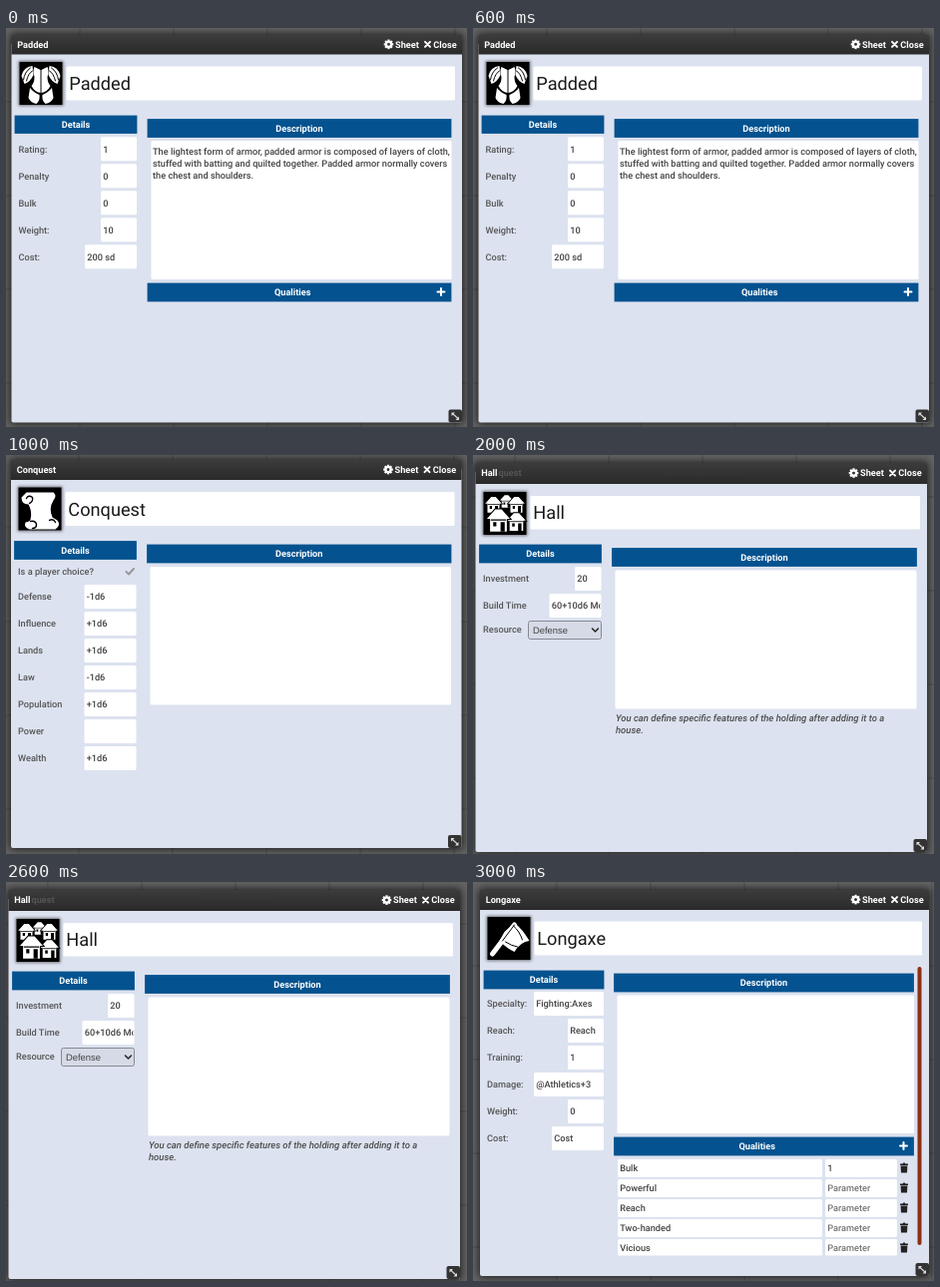
These frames come from a looping animation (462 by 400 pixels, 4 s). An HTML page:

```html
<!DOCTYPE html>
<html lang="en">
<head>
<meta charset="utf-8">
<title>Item sheets</title>
<style>
html, body { margin: 0; width: 100%; height: 100%; overflow: hidden; background: #555; }
#stage { display: block; width: 462px; height: 400px; }
text { font: 500 9.2px Roboto, "Open Sans", sans-serif; fill: #434343; text-rendering: geometricPrecision; white-space: pre; }
.label { fill: #555; }
.soft { fill: #747474; }
.bold { font-weight: 700; fill: #fff; }
.ghost { font-weight: 700; fill: #555; }
.mid { text-anchor: middle; }
.title { font-size: 18.2px; font-weight: 400; fill: #191919; }
.hint { font-size: 9.5px; font-style: italic; fill: #4c4c4c; }
.pick { font: 9.4px "Liberation Sans", Arial, sans-serif; }
</style>
</head>
<body>
<svg id="stage" viewBox="0 0 462 400" xmlns="http://www.w3.org/2000/svg">
  <defs>
    <linearGradient id="bar" x2="0" y2="1">
      <stop stop-color="#3c3c3c"/><stop offset=".3" stop-color="#363636"/><stop offset="1" stop-color="#2a2a2a"/>
    </linearGradient>
    <filter id="blur" x="-20%" y="-20%" width="140%" height="140%"><feGaussianBlur stdDeviation="4"/></filter>
    <filter id="glow" x="-20%" y="-20%" width="140%" height="140%"><feGaussianBlur stdDeviation="1.5"/></filter>
  </defs>
</svg>
<script>
const STEP = 1000;
const stage = document.getElementById("stage");

const rect = (x, y, r, b, fill, extra = "") =>
  `<rect x="${x}" y="${y}" width="${r - x}" height="${b - y}" fill="${fill}" ${extra}/>`;
const path = (d, fill, extra = "") => `<path d="${d}" fill="${fill}" ${extra}/>`;
const line = (d, color, w) => path(d, "none", `stroke="${color}" stroke-width="${w}" stroke-linecap="round" stroke-linejoin="round"`);
const at = (x, y, body) => `<g transform="translate(${x} ${y})">${body}</g>`;
// y is the middle of the capitals
const text = (x, y, s, cls = "") => `<text x="${x}" y="${y + 3.3}" class="${cls}">${s}</text>`;

const box = (x, y, r, b) => rect(x, y, r, b, "#fff", 'rx="1.5"');
const field = (x, y, r, b, s, cls) => box(x, y, r, b) +
  `<svg x="${x}" y="${y}" width="${r - x - 1}" height="${b - y}">${text(2.2, (b - y) / 2, s, cls)}</svg>`;
const heading = (x, y, r, b, s, shift = 0) => rect(x - .4, y - .4, r + .4, b + .4, "#04528f") +
  text((x + r) / 2 + shift, (y + b) / 2, s, "bold mid");
const plus = (x, y) => line(`M${x - 3.5} ${y}h7M${x} ${y - 3.5}v7`, "#fff", 2);
// The add button pushes the caption to the left
const qualities = (x, y, r, b) => heading(x, y, r, b, "Qualities", -6.8) + plus(r - 10, (y + b) / 2 - .5);

const gear = (x, y) => {
  let teeth = "";
  for (let a = 0; a < 360; a += 45) teeth += `<rect x="-1.1" y="-4.8" width="2.2" height="3" fill="#fff" transform="rotate(${a})"/>`;
  return at(x, y, teeth + '<circle r="2.6" fill="none" stroke="#fff" stroke-width="2.2"/>');
};
const trash = (x, y) => at(x, y, path("M-4-4h2.6l.6-1h1.6l.6 1H4v1.4h-8zM-3.4-1.9h6.8L3 5h-6z", "#222"));

const mirror = body => body + `<g transform="translate(43 0) scale(-1 1)">${body}</g>`;

const armor = mirror(
  path("M13 4Q4 5 2 14l3 8q6-2 9-9z", "#fff") +
  line("M11 6Q5 10 4 18M13 9Q9 11 7 19", "#000", 1) +
  path("M21 8l-6-3q-2 4 0 10 0 6-3 9 3 6 9 7z", "#fff") +
  path("M10.500 26q4 5 9.500 7 1 5-3 9-6-1-8-6z", "#fff"));

const scroll =
  path("M8 5h27q4 3 0 8-5 8-1 17l5 3q4 5-2 9H11q-6-2-4-7 5-1 5-3 2-8-2-15-7 0-7-7z", "#fff") +
  line("M11 16q4-2 3-6-4-3-6 1M12 34q5-1 6 3 0 4-4 4M31 33q4-2 6 2", "#000", 1.4);

const house = (x, y, s) => `<g transform="translate(${x} ${y}) scale(${s})">` +
  path("M-11 1L-3-8 3-8 11 1H8V13H-8V1z", "#fff", 'stroke="#000" stroke-width="2" paint-order="stroke"') +
  line("M-7 2H7", "#000", 1) +
  path("M-5 4h3v4h-3zM2 4h4v9h-4z", "#000") + "</g>";
const houses = house(23, 8, .6) + house(10, 11, .75) + house(33, 11, .75) +
  house(33, 28, .85) + house(15, 26, 1.05);

const axe =
  line("M5 37L27 8", "#fff", 5) +
  path("M17 15l10-9q8 6 15 18-9 1-15 11-7-3-15-11z", "#fff") +
  line("M15 24L27 8M26 9q6 5 9 14M18 25q6 4 12 5", "#000", 1);

const icon = (x, y, art) =>
  rect(x - 1, y - 1, x + 44, y + 44, "#000", 'opacity=".5" filter="url(#glow)"') +
  rect(x, y, x + 43, y + 43, "#000") + at(x, y, art);

const backdrop = shift => {
  let d = "";
  for (let x = shift; x < 462; x += 94) d += `M${x} 0V400`;
  for (let y = shift; y < 400; y += 94) d += `M0 ${y}H462`;
  return rect(0, 0, 462, 400, "#646464") + line(d, "#505050", 1);
};

// Window shell: edges, header bottom, name and title field
function sheet({ x, y, r, b, head, name, art, iconAt, input, ghost = "", shift }) {
  const mid = (y + head) / 2 - .4;
  return backdrop(shift) +
    rect(x - 1, y - 1, r + 1, b + 1, "#000", 'opacity=".75" filter="url(#blur)"') +
    rect(x, y + 8, r, b, "#dce2ef", 'rx="2"') +
    rect(x, y, r, head, "url(#bar)") +
    ghost + text(x + 5.7, mid, name, "bold") +
    gear(r - 73.5, mid) + text(r - 67, mid, "Sheet", "bold") +
    line(`M${r - 37} ${mid - 2.5}l5 5m0-5l-5 5`, "#fff", 2) + text(r - 28.7, mid, "Close", "bold") +
    icon(...iconAt, art) + box(...input) +
    `<text class="title" x="${input[0] + 2.8}" y="${(input[1] + input[3]) / 2 + 6.5}">${name}</text>` +
    rect(r - 13.5, b - 13, r, b, "#333", 'rx="2"') +
    line(`M${r - 9} ${b - 8.5}l5 4.5`, "#ddd", 1.1) +
    path(`M${r - 10.5} ${b - 10}h3.5l-3.5 3.5zM${r - 3} ${b - 2.5}h-3.5l3.5-3.5z`, "#ddd");
}

// Rows: label, left edge of the field, value
const rows = (lx, right, top, list) => list.map(([label, x, value], i) => {
  const y = top + i * 27;
  return text(lx, y + 12, label, "label") + field(x, y, right, y + 24, value);
}).join("");

const padded = sheet({
  x: 5.5, y: 7, r: 457, b: 395.5, head: 26.5, name: "Padded", art: armor,
  iconAt: [13.5, 34], input: [60.5, 38.5, 450, 72.5], shift: 74
}) +
  heading(9, 88, 131, 105.5, "Details") +
  rows(12.5, 131, 109.3, [["Rating:", 95, "1"], ["Penalty", 95, "0"], ["Bulk", 95, "0"],
    ["Weight:", 95, "10"], ["Cost:", 79, "200 sd"]]) +
  heading(142, 91.5, 446, 109.5, "Description") + box(145.5, 113, 446.5, 252) +
  ["The lightest form of armor, padded armor is composed of layers of cloth,",
    "stuffed with batting and quilted together. Padded armor normally covers",
    "the chest and shoulders."].map((s, i) => text(147, 124 + i * 11.8, s)).join("") +
  qualities(142, 256, 446, 274);

const conquest = sheet({
  x: 5, y: 5, r: 456.5, b: 394, head: 25, name: "Conquest", art: scroll,
  iconAt: [12.5, 32.5], input: [59.5, 37, 449.5, 71], shift: 73
}) +
  heading(8.5, 86.5, 130.5, 104.5, "Details") +
  text(12, 117, "Is a player choice?", "label") + line("M120.5 117l2.5 2.5 5-5.5", "#999", 2) +
  rows(12, 130.5, 130, [["Defense", 78.5, "-1d6"], ["Influence", 78.5, "+1d6"], ["Lands", 78.5, "+1d6"],
    ["Law", 78.5, "-1d6"], ["Population", 78.5, "+1d6"], ["Power", 78.5, ""], ["Wealth", 78.5, "+1d6"]]) +
  heading(141.5, 90, 446, 108, "Description") + box(144.5, 112, 446, 250.5);

const hall = sheet({
  x: 2.5, y: 8, r: 455, b: 398, head: 29, name: "Hall", art: houses,
  iconAt: [10.5, 37], input: [57.5, 41, 448, 74.5], shift: 42,
  ghost: text(25.5, 18, "quest", "ghost")
}) +
  heading(6.5, 90, 128.5, 108, "Details") +
  rows(10, 128.5, 112, [["Investment", 102, "20"], ["Build Time", 76.5, "60+10d6 Months"]]) +
  text(10, 175, "Resource", "label") +
  rect(55.5, 166.5, 128.5, 184.5, "#d5dae6", 'rx="2" stroke="#858994"') +
  text(60, 175.5, "Defense", "pick") + line("M119.5 174l3 3 3-3", "#222", 1.5) +
  heading(139.5, 93.5, 444.5, 111.5, "Description") + box(142.5, 115.5, 444.5, 254.5) +
  text(143, 264, "You can define specific features of the holding after adding it to a", "hint") +
  text(143, 276, "house.", "hint");

const quality = ([name, value, cls], i) => {
  const y = 278 + i * 20, b = Math.min(y + 18, 374.5);
  return field(145, y, 350, b, name) + field(353, y, 425, b, value, cls) + trash(432, y + 8.5);
};
const longaxe = sheet({
  x: 7, y: 8, r: 457, b: 395, head: 28, name: "Longaxe", art: axe,
  iconAt: [14.5, 35], input: [61.5, 39.5, 450, 73.5], shift: 84
}) +
  heading(11, 89, 131, 107, "Details") +
  rows(14, 131, 110, [["Specialty:", 61, "Fighting:Axes"], ["Reach:", 95, "Reach"], ["Training:", 95, "1"],
    ["Damage:", 61, "@Athletics+3"], ["Weight:", 95, "0"], ["Cost:", 79, "Cost"]]) +
  heading(141.5, 92, 441.5, 110, "Description") + box(144.5, 113.5, 442, 252) +
  qualities(141.5, 256, 441.5, 274) +
  [["Bulk", "1"], ...["Powerful", "Reach", "Two-handed", "Vicious"].map(n => [n, "Parameter", "soft"])].map(quality).join("") +
  rect(445.5, 85, 449.5, 364, "#8c2f12", 'rx="2"');

const scenes = [padded, conquest, hall, longaxe];
const share = 1 / scenes.length;
const loop = STEP * scenes.length;
scenes.forEach((body, i) => {
  const g = document.createElementNS("http://www.w3.org/2000/svg", "g");
  g.innerHTML = body;
  stage.append(g);
  const anim = g.animate([
    { opacity: 1, offset: 0 }, { opacity: 1, offset: share },
    { opacity: 0, offset: share }, { opacity: 0, offset: 1 }
  ], { duration: loop, delay: i * STEP - loop, iterations: Infinity });
  anim.startTime = 0;
});
</script>
</body>
</html>
```
